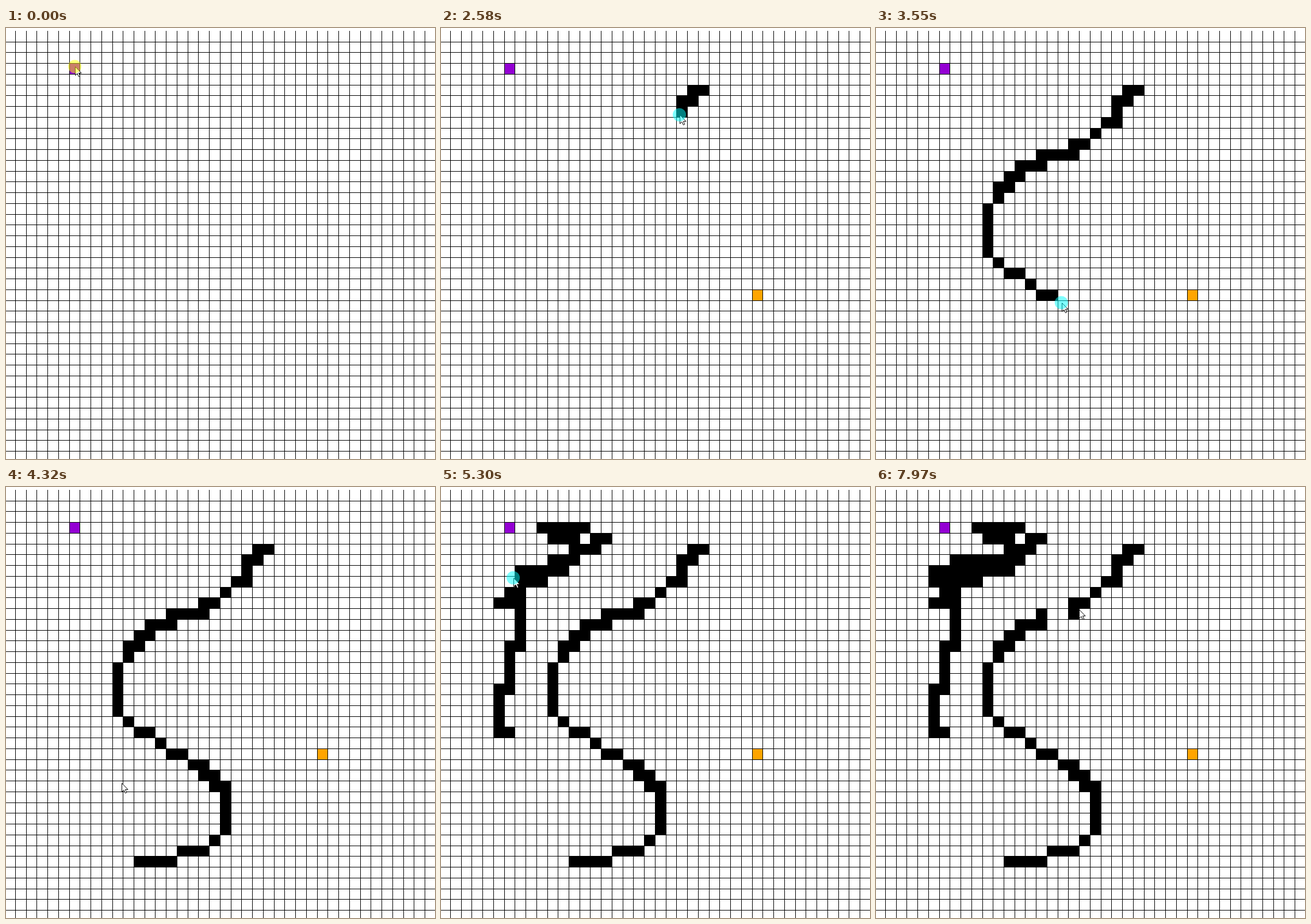
An HTML page with a canvas for the animation above (8000 ms loop, 746x750 px).

```html
<!DOCTYPE html>
<html lang="en">
<head>
<meta charset="utf-8">
<title>Grid drawing</title>
<style>
  html, body { margin: 0; width: 100%; height: 100%; overflow: hidden; background: #fff; }
  canvas { display: block; }
</style>
</head>
<body>
<canvas id="stage" width="746" height="750"></canvas>
<script>
const ctx = document.getElementById('stage').getContext('2d');
const WIDTH = 746, HEIGHT = 750, LOOP = 8000;
const STEP = 69.6, STROKE_START = 2370;   // the pointer moves in steps, counted from the first stroke
const CELL = 18.745, LEFT = -2.445, TOP = 5.455;
const SAMPLES = 12;

const colX = col => Math.floor(LEFT + col * CELL);
const rowY = row => Math.floor(TOP + row * CELL);

const moves = [];
const marks = [];

// Catmull-Rom spline through evenly timed points, u from 0 to 1
function along(points, u) {
  const last = points.length - 1;
  const i = Math.max(0, Math.min(last - 1, Math.floor(u * last)));
  const f = u * last - i;
  const at = k => points[Math.max(0, Math.min(last, k))];
  return [0, 1].map(axis => {
    const [a, b, c, d] = [-1, 0, 1, 2].map(k => at(i + k)[axis]);
    return b + f / 2 * (c - a + f * (2 * a - 5 * b + 4 * c - d + f * (3 * (b - c) + d - a)));
  });
}

function move(start, end, points, halo) {
  moves.push({ start, end, points, halo });
}

// A move that also colours every cell it passes over
function brush(start, end, points, halo, color) {
  move(start, end, points, halo);
  const count = (points.length - 1) * SAMPLES;
  for (let i = 0; i <= count; i++) {
    const [x, y] = along(points, i / count);
    marks.push({
      at: start + (end - start) * i / count,
      col: Math.floor((x - LEFT) / CELL),
      row: Math.floor((y - TOP) / CELL),
      color
    });
  }
}

move(-35, -31, [[120, 67]], 'yellow');
move(-31, -20, [[120, 67], [534, 462]]);
move(-20, -15, [[534, 462], [556, 466]]);
move(-12, -10, [[556, 466]], 'yellow');
move(-10, -1, [[556, 466], [455, 101]]);
brush(0, 24, [[455, 101], [415, 151], [338, 213], [240, 255], [196, 330],
  [214, 411], [368, 512], [371, 608], [228, 658]], 'cyan', '#000');
move(24, 28, [[228, 658], [201, 515]]);
brush(29, 49, [[126, 430], [101, 424], [100, 380], [115, 346], [124, 292], [138, 260],
  [137, 215], [103, 202], [137, 183], [212, 133], [288, 88], [172, 71], [235, 108],
  [126, 158], [150, 128], [250, 127], [212, 145], [155, 163], [108, 165], [103, 146],
  [125, 146]], 'cyan', '#000');
move(49, 53, [[125, 146], [249, 240]]);
move(53, 59, [[249, 240], [272, 256], [286, 249]]);
move(64, 66, [[286, 249], [284, 234]]);
move(70, 73, [[284, 234], [300, 227]]);
brush(73, 78, [[300, 227], [333, 221]], 'yellow', '#fff');
move(78, 80, [[333, 221], [353, 213]]);

function fillCell(col, row, color) {
  const x = colX(col), y = rowY(row);
  ctx.fillStyle = color;
  ctx.fillRect(x, y, colX(col + 1) - x, rowY(row + 1) - y);
}

function drawGrid() {
  ctx.fillStyle = '#000';
  for (let col = 1; colX(col) < WIDTH; col++) ctx.fillRect(colX(col), rowY(0), 1, HEIGHT);
  for (let row = 1; rowY(row) < HEIGHT; row++) ctx.fillRect(0, rowY(row), WIDTH, 1);
}

const arrow = new Path2D('M.5 .5V15.5L4 12.3L6.4 17.7L8.8 16.7L6.5 11.4H11Z');
function drawPointer(x, y) {
  ctx.save();
  ctx.translate(Math.round(x), Math.round(y));
  ctx.fillStyle = '#fff';
  ctx.strokeStyle = '#000';
  ctx.fill(arrow);
  ctx.stroke(arrow);
  ctx.restore();
}

function drawHalo(x, y, color) {
  ctx.globalAlpha = 0.5;
  ctx.fillStyle = color;
  ctx.beginPath();
  ctx.arc(x - 0.5, y, 11.5, 0, Math.PI * 2);
  ctx.fill();
  ctx.globalAlpha = 1;
}

function draw(time) {
  const step = Math.floor((time % LOOP - STROKE_START) / STEP + 0.2);
  const current = moves.findLast(m => m.start <= step) ?? moves[0];
  const { start, end, points, halo } = current;
  const [x, y] = points.length > 1
    ? along(points, Math.min(1, (step - start) / (end - start)))
    : points[0];

  ctx.fillStyle = '#fff';
  ctx.fillRect(0, 0, WIDTH, HEIGHT);
  fillCell(6, 3, '#9400d3');
  if (step >= -12) fillCell(29, 24, '#ffa500');
  for (const { at, col, row, color } of marks) if (at < step) fillCell(col, row, color);
  drawGrid();
  drawPointer(x, y);
  if (halo && step < end) drawHalo(x, y, halo);
}

let began;
function animate(now) {
  began ??= now;
  draw(now - began);
  requestAnimationFrame(animate);
}
requestAnimationFrame(animate);
</script>
</body>
</html>
```
